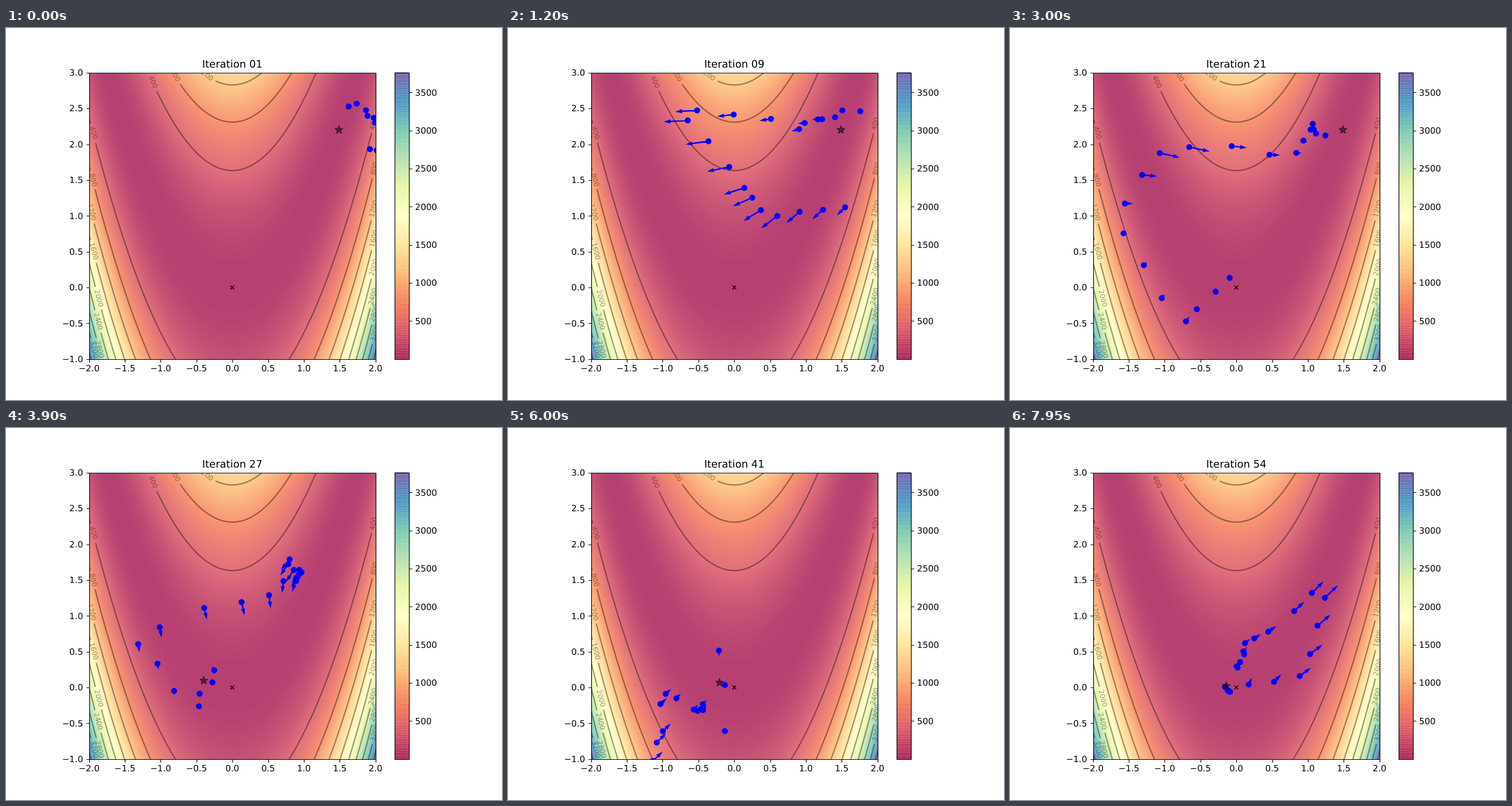
Write an HTML page with a canvas that moves like this. It is 864 px wide and 648 px high and loops after 8 s.

```html
<!DOCTYPE html>
<html lang="en">
<head>
<meta charset="utf-8">
<title>Particle swarm</title>
<style>
  html, body { margin: 0; width: 864px; height: 648px; overflow: hidden; background: #fff; }
  canvas, svg { position: absolute; left: 0; top: 0; display: block; }
  text { font-family: "DejaVu Sans", Verdana, sans-serif; font-size: 15px; text-rendering: geometricPrecision; }
  .title { font-size: 18px; }
  .level { font-size: 12px; fill-opacity: .4; }
  .level, .mid { text-anchor: middle; }
  .end { text-anchor: end; }
  .contour { fill: none; stroke: #000; stroke-opacity: .4; stroke-width: 2.25; }
  .axis { fill: none; stroke: #000; stroke-width: 1.2; }
</style>
</head>
<body>
<canvas id="field" width="864" height="648"></canvas>
<svg width="864" height="648" viewBox="0 0 864 648">
  <defs><clipPath id="box"><rect x="145" y="78" width="499" height="499"/></clipPath></defs>
  <g clip-path="url(#box)">
    <g id="contours"></g>
    <path id="swarm" fill="#00f"/>
    <path d="M390.9 448.7l6.6 6.6m0 -6.6l-6.6 6.6" stroke="#000" stroke-width="1.5"/>
    <path id="star" fill-opacity=".5" stroke="#000" stroke-opacity=".5" stroke-width="1.5" stroke-linejoin="bevel"/>
  </g>
  <g id="axes"></g>
  <text id="title" class="title mid" x="394.2" y="69"></text>
</svg>
<script>
const $ = id => document.getElementById(id);
const LEFT = 144.72, TOP = 77.76, SIZE = 498.96, UNIT = SIZE / 4;
const px = x => LEFT + (x + 2) * UNIT;
const py = y => TOP + (3 - y) * UNIT;
const dataX = p => (p - LEFT) / UNIT - 2;
const dataY = p => 3 - (p - TOP) / UNIT;
const cost = (x, y) => x * x + 150 * (y - x * x) ** 2;
const snap = p => Math.round(p) + .5;

function add(parent, tag, attrs, text) {
  const el = document.createElementNS('http://www.w3.org/2000/svg', tag);
  for (const k in attrs) el.setAttribute(k, attrs[k]);
  if (text !== undefined) el.textContent = text;
  parent.appendChild(el);
}

// Filled contours and colour bar
const BANDS = 188, STEP = 20, ALPHA = .75;
const spectral = ['9e0142', 'd53e4f', 'f46d43', 'fdae61', 'fee08b', 'ffffbf',
  'e6f598', 'abdda4', '66c2a5', '3288bd', '5e4fa2']
  .map(h => [0, 2, 4].map(i => parseInt(h.slice(i, i + 2), 16)));

function bandColor(band) {
  const t = band / (BANDS - 1) * 10, i = Math.min(Math.floor(t), 9);
  return spectral[i].map((c, k) => c + (spectral[i + 1][k] - c) * (t - i));
}

function drawField() {
  const ctx = $('field').getContext('2d');
  const palette = Array.from({ length: BANDS }, (_, i) => bandColor(i));
  const x0 = 145, y0 = 78, n = 499, img = ctx.createImageData(n, n);
  for (let j = 0, p = 0; j < n; j++) {
    for (let i = 0; i < n; i++) {
      const value = cost(dataX(x0 + i + .5), dataY(y0 + j + .5));
      const color = palette[Math.min(BANDS - 1, Math.floor(value / STEP))];
      for (const c of color) img.data[p++] = 255 + (c - 255) * ALPHA;
      img.data[p++] = 255;
    }
  }
  ctx.putImageData(img, x0, y0);
  palette.forEach((c, i) => {
    const bottom = Math.ceil(TOP + SIZE * (1 - i / BANDS));
    const top = Math.floor(TOP + SIZE * (1 - (i + 1) / BANDS));
    ctx.fillStyle = `rgba(${c.map(Math.round)},${ALPHA})`;
    ctx.fillRect(677, top, 25, bottom - top);
  });
}

// One contour branch above (sign 1) or below (-1) the valley, broken at its label
function drawBranch(level, sign, from, to, labelX) {
  const y = x => x * x + sign * Math.sqrt((level - x * x) / 150);
  const cx = px(labelX), cy = py(y(labelX));
  const gap = String(level).length * 3.82 + 5;
  let d = '', pen = 'M';
  for (let i = 0; i <= 400; i++) {
    const x = from + (to - from) * i / 400, X = px(x), Y = py(y(x));
    if (Math.hypot(X - cx, Y - cy) < gap) { pen = 'M'; continue; }
    d += pen + X.toFixed(2) + ' ' + Y.toFixed(2);
    pen = 'L';
  }
  add($('contours'), 'path', { d, class: 'contour' });
  const angle = Math.atan(-2 * labelX) * 180 / Math.PI;
  add($('contours'), 'text', {
    class: 'level', y: 3, transform: `translate(${cx} ${cy}) rotate(${angle})`
  }, level);
}

function drawContours() {
  const inner = [255.5, 293.8, 347];
  const left = [183, 265, 321, 389, 471, 511, 560, 560, 700];
  const right = [167, 245, 315, 367, 417, 468, 497, 531, 700];
  left.forEach((leftY, i) => {
    const level = 400 * (i + 1), d = Math.sqrt((level - 3.6) / 150);
    const near = .95 * Math.sqrt(d - 1);
    const labelX = y => Math.sqrt(dataY(y) + d);
    drawBranch(level, -1, -near, -2.02, -labelX(leftY));
    drawBranch(level, -1, near, 2.02, labelX(right[i]));
    if (inner[i]) drawBranch(level, 1, -1.3, 1.3, dataX(inner[i]));
  });
}

function drawAxes() {
  const g = $('axes');
  const label = v => v.toFixed(1).replace('-', '\u2212');
  let d = 'M145.5 78.5H644.5V577.5H145.5ZM677.5 78.5H702.5V577.5H677.5Z';
  for (let i = 0; i <= 8; i++) {
    const v = i / 2, x = px(v - 2), y = py(v - 1);
    d += `M${snap(x)} 577.5v5.25M145.5 ${snap(y)}h-5.25`;
    add(g, 'text', { x, y: 598, class: 'mid' }, label(v - 2));
    add(g, 'text', { x: 134.2, y: Math.round(y + 5.3), class: 'end' }, label(v - 1));
  }
  for (let v = 500; v <= 3500; v += 500) {
    const y = TOP + SIZE * (1 - v / (BANDS * STEP));
    d += `M702.5 ${snap(y)}h5.25`;
    add(g, 'text', { x: 712.6, y: Math.round(y + 5.3) }, v);
  }
  add(g, 'path', { d, class: 'axis' });
}

// The swarm is strung along a bent line that changes shape over the iterations
const COUNT = 20, JITTER = 8;
const bends = [
  [1, [605, 130], [634, 150], [644, 172], [690, 130], [700, 200], [690, 230], [627, 210]],
  [9, [610, 139], [545, 165], [500, 170], [300, 140], [400, 270], [455, 330], [590, 314]],
  [15, [574, 181], [510, 140], [450, 220], [90, 150], [190, 350], [285, 535], [440, 400]],
  [27, [492, 222], [515, 250], [515, 256], [455, 290], [210, 355], [328, 490], [365, 420]],
  [34, [285, 538], [262, 562], [235, 545], [200, 620], [230, 640], [300, 620], [387, 252]],
  [41, [325, 486], [336, 490], [275, 467], [262, 570], [230, 615], [390, 600], [372, 386]],
  [54, [400, 422], [400, 400], [430, 370], [545, 265], [520, 430], [375, 450], [376, 452]]
];

let seed = 7;
function random() {
  seed = seed * 16807 % 2147483647;
  return seed / 2147483647;
}

const poses = bends.map(([iteration, ...line]) => ({
  iteration,
  at: Array.from({ length: COUNT }, (_, i) => {
    const s = i / (COUNT - 1) * (line.length - 1);
    const k = Math.min(Math.floor(s), line.length - 2);
    return line[k].map((p, axis) =>
      p + (line[k + 1][axis] - p) * (s - k) + (2 * random() - 1) * JITTER);
  })
}));

// Velocity per iteration, from the neighbouring poses; the swarm starts at rest
function velocity(k, i, axis) {
  if (k === 0) return 0;
  const a = poses[k - 1], b = poses[Math.min(k + 1, poses.length - 1)];
  return (b.at[i][axis] - a.at[i][axis]) / (b.iteration - a.iteration);
}

// Best position so far: first iteration, x, y
const best = [[1, 580, 177.5], [24, 361, 437], [27, 344.5, 440], [31, 363, 442],
  [38, 368.5, 443.5], [49, 376.5, 449.5]];

// Cubic Hermite value and slope per iteration
function hermite(p, v, q, w, span, t) {
  const a = v * span, b = w * span;
  const c2 = 3 * (q - p) - 2 * a - b, c3 = 2 * (p - q) + a + b;
  return [p + t * (a + t * (c2 + t * c3)), (a + t * (2 * c2 + 3 * t * c3)) / span];
}

function dot(x, y, r = 5.25) {
  return `M${x - r} ${y}a${r} ${r} 0 1 1 ${2 * r} 0a${r} ${r} 0 1 1 ${-2 * r} 0Z`;
}

function arrow(x, y, vx, vy) {
  const len = Math.hypot(vx, vy);
  if (len < 2.5) return '';
  const k = Math.min(1, len / 12.47), ux = vx / len, uy = vy / len;
  const shaft = 1.25 * k, head = 3.74 * k, notch = len - 11.23 * k, back = len - 12.47 * k;
  const points = [[0, -shaft], [notch, -shaft], [back, -head], [len, 0],
    [back, head], [notch, shaft], [0, shaft]];
  return 'M' + points.map(([a, b]) =>
    `${(x + a * ux - b * uy).toFixed(2)} ${(y + a * uy + b * ux).toFixed(2)}`).join('L') + 'Z';
}

function starPath(cx, cy) {
  const points = [];
  for (let i = 0; i < 10; i++) {
    const r = i % 2 ? 2.86 : 7.5, a = i * Math.PI / 5;
    points.push(`${cx + r * Math.sin(a)} ${cy - r * Math.cos(a)}`);
  }
  return 'M' + points.join('L') + 'Z';
}

function render(iteration) {
  let k = 0;
  while (k < poses.length - 2 && poses[k + 1].iteration <= iteration) k++;
  const from = poses[k], to = poses[k + 1];
  const span = to.iteration - from.iteration, t = (iteration - from.iteration) / span;
  let d = '';
  for (let i = 0; i < COUNT; i++) {
    const [[x, vx], [y, vy]] = [0, 1].map(axis => hermite(
      from.at[i][axis], velocity(k, i, axis), to.at[i][axis], velocity(k + 1, i, axis), span, t));
    d += dot(x, y) + arrow(x, y, vx, vy);
  }
  $('swarm').setAttribute('d', d);
  const [, sx, sy] = best.filter(b => b[0] <= iteration).pop();
  $('star').setAttribute('d', starPath(sx, sy));
  $('title').textContent = 'Iteration ' + String(iteration).padStart(2, '0');
}

const LOOP = 8000, HOLD = 150;
let shown = 0;
function tick() {
  const iteration = Math.floor(performance.now() % LOOP / HOLD) + 1;
  if (iteration !== shown) render(shown = iteration);
  requestAnimationFrame(tick);
}

drawField();
drawContours();
drawAxes();
tick();
</script>
</body>
</html>
```
